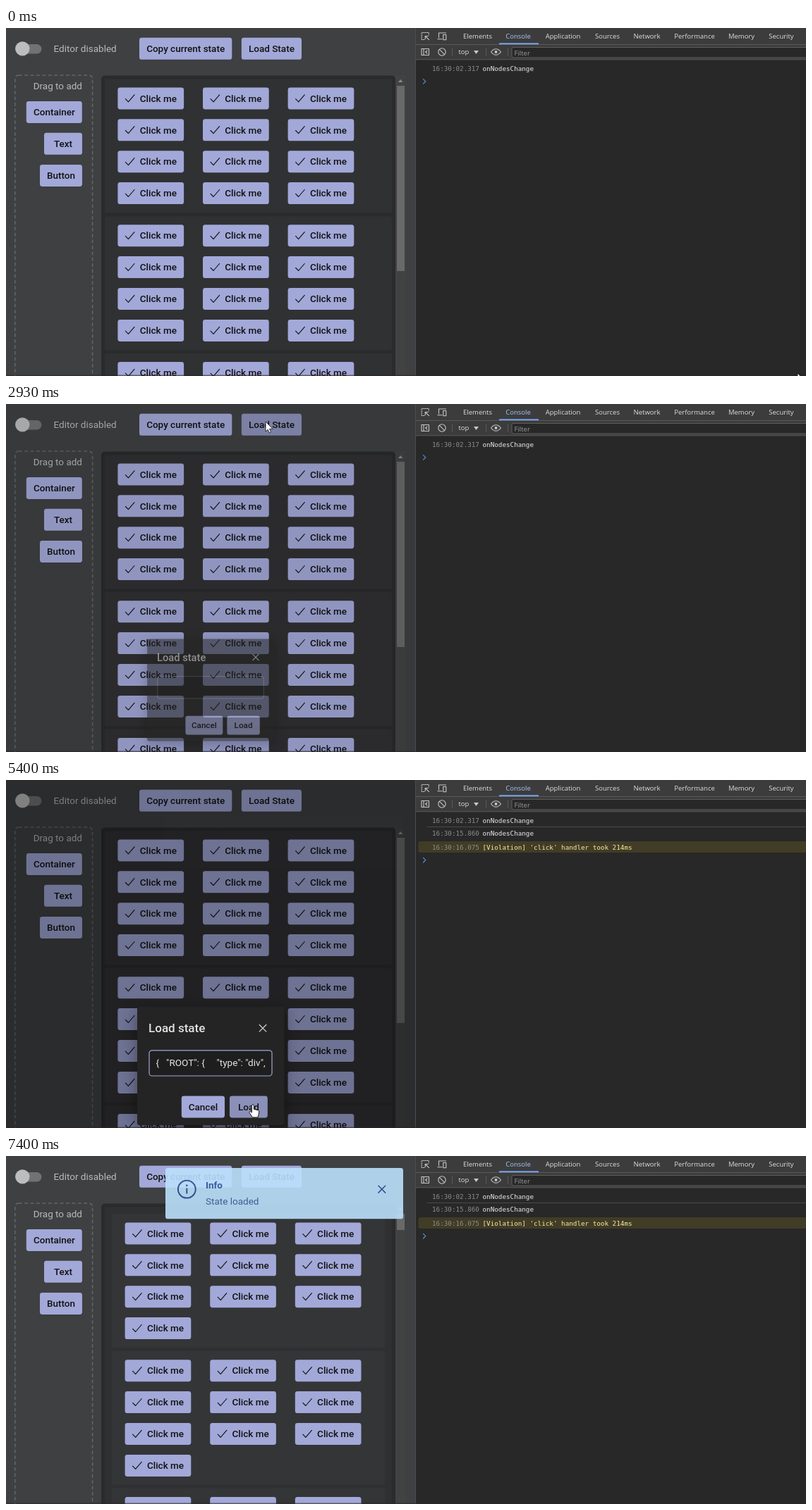
Write an HTML page that moves like this. It is 1134 px wide and 494 px high and loops after 7470 ms.

```html
<!DOCTYPE html>
<html lang="en">
<head>
<meta charset="utf-8">
<title>Editor state loading</title>
<style>
  html, body { margin: 0; width: 100%; height: 100%; overflow: hidden; background: #3e4042; }
  svg { display: block; width: 1134px; height: 494px; }
  text { font-family: Roboto, sans-serif; font-size: 13.5px; white-space: pre; }
  .b { font-weight: 500; fill: #121212; text-anchor: middle; }
  .tab { font-family: "Open Sans", "Noto Sans", sans-serif; font-size: 9.5px; fill: #dedede; }
  .mid { text-anchor: middle; }
  .log { font-family: "DejaVu Sans Mono", monospace; font-size: 9.27px; }
  .line { fill: none; stroke-linecap: round; stroke-linejoin: round; }
</style>
</head>
<body>
<svg id="stage" viewBox="0 0 1134 494"></svg>
<script>
const LOOP = 7470;
const LILAC = '#a2a8d8', PRESSED = '#8b90b9';
const BODY = '#3e4042', SOFT = '#b8b9ba', NAVY = '#2f5396';

const rect = (x, y, w, h, fill, r = 0, more = '') =>
  `<rect x="${x}" y="${y}" width="${w}" height="${h}" rx="${r}" fill="${fill}" ${more}/>`;
const text = (x, y, s, more = '') => `<text x="${x}" y="${y}" ${more}>${s}</text>`;
const path = (d, stroke, width = 1, more = '') =>
  `<path class="line" d="${d}" stroke="${stroke}" stroke-width="${width}" ${more}/>`;
const group = (id, inner, more = '') => `<g id="${id}" ${more}>${inner}</g>`;
const button = (x, y, w, label, id = '') =>
  rect(x, y, w, 31, LILAC, 3.4, id && `id="${id}"`) +
  text(x + w / 2, y + 20.2, label, 'class="b"');
const cross = (x, y, r, color, w) =>
  path(`M${x - r} ${y - r}l${2 * r} ${2 * r}m0 ${-2 * r}l${-2 * r} ${2 * r}`, color, w);

function clickMe(x, y) {
  return rect(x, y, 93.7, 31, LILAC, 3.4) +
    path(`M${x + 11} ${y + 16.2}l4 4.2 8.6 -10`, '#121212', 1.15) +
    text(x + 31.3, y + 20.2, 'Click me', 'font-weight="500" fill="#121212"');
}

// Three stacked containers, each holding `count` buttons in rows of three
function containers(x, y, w, fill, bx, by, count) {
  let out = '';
  for (let g = 0; g < 3; g++) {
    const dy = g * 194.8;
    out += rect(x, y + dy, w, 190, fill, 3);
    for (let i = 0; i < count; i++)
      out += clickMe(bx + i % 3 * 120.6, by + dy + Math.floor(i / 3) * 44.9);
  }
  return out;
}

function editor() {
  return rect(0, 0, 581, 494, BODY) +
    rect(17, 23, 33.5, 13.5, '#717273', 6.75) +
    '<circle cx="23.3" cy="29.4" r="10.2" fill="#bdbdbd"/>' +
    text(67.5, 34, 'Editor disabled', `fill="${SOFT}"`) +
    button(189, 13.8, 131.3, 'Copy current state') +
    button(333.8, 13.8, 85.2, 'Load State', 'open') +
    rect(12.8, 67, 109.8, 460, 'none', 5, 'stroke="#626466" stroke-width="1.6" stroke-dasharray="5 3.4"') +
    text(108, 87, 'Drag to add', `fill="${SOFT}" text-anchor="end"`) +
    button(28.8, 104, 79, 'Container') +
    button(54, 148.8, 54, 'Text') +
    button(48, 194, 60, 'Button') +
    rect(135, 67.5, 417, 440, '#2a2b2d', 5) +
    group('before', containers(140, 72.4, 407, '#303133', 158.4, 84.4, 12)) +
    group('after', rect(140, 72.4, 407, 440, '#2f3032', 3) +
      containers(149.5, 82, 387.5, '#343537', 168.6, 94.4, 10)) +
    rect(552, 67.5, 14, 427, '#424242') +
    rect(554, 82, 11, 263, '#696969', 0, 'id="thumb"') +
    '<path d="M555.8 77l3.4-4 3.4 4z" fill="#8a8a8a"/>';
}

function dialog() {
  return rect(186, 322, 208.5, 168, '#242424', 3.4, 'style="filter:drop-shadow(0 6px 10px #0006)"') +
    text(202, 358, 'Load state', 'font-weight="500" fill="#e2e2e2" style="font-size:17px"') +
    cross(364, 352.3, 4.8, '#cfcfcf', 1.3) +
    rect(203, 383.8, 174, 36.2, '#1e1e1e', 4, 'id="field"') +
    '<clipPath id="fieldClip"><rect x="213" y="386" width="154.5" height="32"/></clipPath>' +
    '<g clip-path="url(#fieldClip)" fill="#e4e4e4">' +
    text(366, 406.2, '"type": "normal",       "icon": "pi pi-che', 'id="tail" text-anchor="end"') +
    text(212.5, 406.2, '{   "ROOT": {     "type": "div",', 'id="head"') +
    rect(366.3, 394, 1, 16, '#e4e4e4', 0, 'id="caret"') + '</g>' +
    button(248.8, 448.4, 61.2, 'Cancel') +
    button(317, 448.4, 53.8, 'Load', 'load');
}

function logRow(y, time, message, color) {
  return text(604, y, time, 'class="log" fill="#8d8d8d"') +
    text(675.5, y, message, `class="log" fill="${color}"`);
}

function devtools() {
  const tabs = [['Elements', 668.5], ['Console', 726], ['Application', 789.5], ['Sources', 852.5],
    ['Network', 908.5], ['Performance', 976], ['Memory', 1042.5], ['Security', 1099]];
  const ink = '#c7c7c7';
  return rect(580.5, 0, 554, 494, '#282828') +
    rect(580.5, 0, 554, 45, '#3c3c3c') +
    rect(580.5, 23, 554, 1, '#5a5a5a') + rect(580.5, 44.3, 554, 1, '#5a5a5a') +
    rect(580, 0, 1, 494, '#4d4d4d') +
    tabs.map(([s, x]) => text(x, 15.2, s,
      `class="tab mid" ${s === 'Console' ? 'style="fill:#a8c7fa"' : ''}`)).join('') +
    rect(699, 21.4, 56, 1.8, '#7cacf8') +
    // inspect and device icons
    path('M593 16.5H589.2V6.5H599.2V10', ink, 1.1, 'stroke-dasharray="1.6 1.4"') +
    path('M594.3 11.5l5.2 5.2M594.3 15.5v-4h4', ink, 1.1) +
    path('M613.5 13.8V7h10M612 15.8h6M619.8 9.5h4v7.3h-4z', ink, 1.1) +
    // sidebar, clear and eye icons
    path('M589 29.5h10.5v9h-10.5zM592 29.5v9M597 32l-2.3 2 2.3 2', ink, 1.1) +
    '<circle cx="618" cy="34" r="5.2" fill="none" stroke="#c7c7c7" stroke-width="1.1"/>' +
    path('M614.4 30.4l7.2 7.2', ink, 1.1) +
    path('M687.5 34q7-8.5 14 0q-7 8.5-14 0z', ink, 1.1) +
    '<circle cx="694.5" cy="34" r="2" fill="#c7c7c7"/>' +
    text(641.5, 37.4, 'top', 'class="tab"') +
    '<path d="M663 32h7l-3.5 5z" fill="#c7c7c7"/>' +
    [632, 680, 711].map(x => rect(x, 28.5, 1, 11, '#5a5a5a')).join('') +
    rect(717, 27.5, 430, 14.5, '#282828', 2, 'stroke="#5e5e5e"') +
    text(720.5, 38.6, 'Filter', 'class="tab" style="fill:#9b9b9b"') +
    logRow(60.8, '16:30:02.317', 'onNodesChange', '#e8eaed') +
    group('second', rect(597, 66, 537, 1, '#4a4a4a') +
      logRow(79.4, '16:30:15.860', 'onNodesChange', '#e8eaed')) +
    group('warning', rect(584.5, 87, 560, 16, '#413c26', 3) +
      logRow(98.6, '16:30:16.075', "[Violation] 'click' handler took 214ms", '#f8eba5')) +
    path('M591.5 72.6l3.3 3.3-3.3 3.3', '#5b8fd6', 1.2, 'id="prompt"');
}

function toast() {
  return rect(226, 17, 337, 72.3, '#bce0fc', 3.4) +
    `<circle cx="256.3" cy="47.2" r="12.4" fill="none" stroke="${NAVY}" stroke-width="2"/>` +
    path('M256.3 46.5v6.3', NAVY, 2) + `<circle cx="256.3" cy="41.8" r="1.4" fill="${NAVY}"/>` +
    text(283, 46.4, 'Info', `font-weight="700" fill="${NAVY}"`) +
    text(283, 69, 'State loaded', 'fill="#41609c"') +
    cross(532.8, 47.2, 4.9, NAVY, 1.5);
}

const cursors = {
  arrow: '<path d="M0 0V14L3.2 11.2 5.3 16 7.5 15 5.5 10.3H10Z" fill="#fff" stroke="#111" stroke-width=".8"/>',
  hand: '<path d="M-1.6 11V1.4a1.5 1.5 0 0 1 3 0V6.4l6 1.5q1.7.5 1.4 2.3L8 14.5 7 18H-.5L-4.8 11.6q-.6-1.5.6-1.9 1-.2 2.6 1.3z" fill="#fff" stroke="#111"/>',
  beam: path('M-2.5-7h5M0-7V7M-2.5 7h5', '#dcdcdc', 1)
};

stage.innerHTML = editor() +
  rect(0, 0, 580, 494, '#000', 0, 'id="shade"') +
  group('dialog', dialog()) + group('toast', toast()) + devtools() +
  rect(0, 492.5, 1134, 1.5, '#2b2529', 0, 'opacity=".6"') +
  group('cursor', Object.entries(cursors).map(([k, d]) => group(k, d)).join(''));

// time, x, y, pointer shape from here on
const track = [
  [70, 1122, 490, 'arrow'], [200, 1080, 468], [400, 880, 350], [600, 560, 215],
  [800, 323, 140, 'hand'], [930, 195, 95, 'arrow'], [1070, 90, 50], [1200, 40, 27, 'hand'],
  [1400, 26, 21], [1800, 22, 25], [2070, 37, 31], [2200, 45, 32], [2330, 130, 32, 'arrow'],
  [2400, 262, 28, 'hand'], [2470, 355, 28], [2540, 394, 29], [2670, 368, 25],
  [2900, 368, 25, 'arrow'], [2980, 368, 25], [3130, 355, 120], [3400, 308, 340],
  [3600, 296, 402, 'beam'], [3930, 290, 411], [4330, 290, 411], [4530, 300, 424, 'arrow'],
  [4730, 330, 455, 'hand'], [4870, 346, 469], [5000, 349.5, 460], [5440, 350, 461, 'arrow'],
  [6340, 350, 461], [6470, 315, 455], [6600, 240, 470], [6680, 186, 488], [6730, 165, 505]
];

const $ = id => document.getElementById(id);
const set = (id, attrs) => { for (const k in attrs) $(id).setAttribute(k, attrs[k]); };
const show = (id, on) => set(id, { visibility: on ? 'visible' : 'hidden' });
const ramp = (t, start, length) => Math.min(1, Math.max(0, (t - start) / length));

function bezier(x1, y1, x2, y2) {
  const at = (u, a, b) => 3 * u * (1 - u) * (1 - u) * a + 3 * u * u * (1 - u) * b + u * u * u;
  return x => {
    let lo = 0, hi = 1;
    for (let i = 0; i < 24; i++) {
      const m = (lo + hi) / 2;
      if (at(m, x1, x2) < x) lo = m; else hi = m;
    }
    return at(lo, y1, y2);
  };
}
const ease = bezier(.25, .1, .25, 1);
const decelerate = bezier(0, 0, .2, 1);

function moveCursor(t) {
  let i = 0, shape = 'arrow';
  while (i < track.length && track[i][0] <= t) shape = track[i++][3] || shape;
  const a = track[Math.max(0, i - 1)], b = track[Math.min(i, track.length - 1)];
  const p = b[0] > a[0] ? ramp(t, a[0], b[0] - a[0]) : 0;
  const x = a[1] + (b[1] - a[1]) * p, y = a[2] + (b[2] - a[2]) * p;
  set('cursor', { transform: `translate(${x} ${y})` });
  for (const k in cursors) set(k, { display: k === shape ? 'inline' : 'none' });
}

function draw(t) {
  const loaded = t > 5440;
  show('before', !loaded);
  show('after', loaded);
  set('thumb', { height: loaded ? 23 : 263 });
  set('open', { fill: t >= 2860 && t < 3130 ? PRESSED : LILAC });

  // dialog opens, then closes once the state is in
  const leave = ramp(t, 5400, 130);
  const shade = ease(ramp(t, 2899, 150)) * (1 - ease(leave));
  const pop = decelerate(ramp(t, 2899, 150)) * (1 - decelerate(leave));
  set('shade', { opacity: .32 * shade });
  set('dialog', { opacity: pop,
    transform: `translate(290 406) scale(${.7 + .3 * pop}) translate(-290 -406)` });

  const clicked = t >= 5125, pasted = t >= 4325;
  const focus = clicked ? 0 : ramp(t, 3620, 200);
  set('field', {
    stroke: clicked || focus > 0 ? '#9fa8da' : '#5a5a5a',
    'stroke-width': 1.2 + .7 * focus
  });
  show('tail', pasted && !clicked);
  show('head', clicked);
  show('caret', focus > 0);
  set('load', { fill: clicked ? PRESSED : LILAC });

  const warned = t >= 5395;
  show('second', t >= 5195);
  show('warning', warned);
  set('prompt', { transform: `translate(0 ${warned ? 37.8 : t >= 5195 ? 18.9 : 0})` });

  const rise = ease(ramp(t, 5396, 300));
  set('toast', { opacity: .9 * rise, transform: `translate(0 ${36.2 * (1 - rise)})` });
  moveCursor(t);
}

const STEP = 1000 / 15;
function tick() {
  const t = performance.now() % LOOP;
  draw(Math.floor((t + 3.4) / STEP) * STEP);
  requestAnimationFrame(tick);
}
tick();
</script>
</body>
</html>
```
